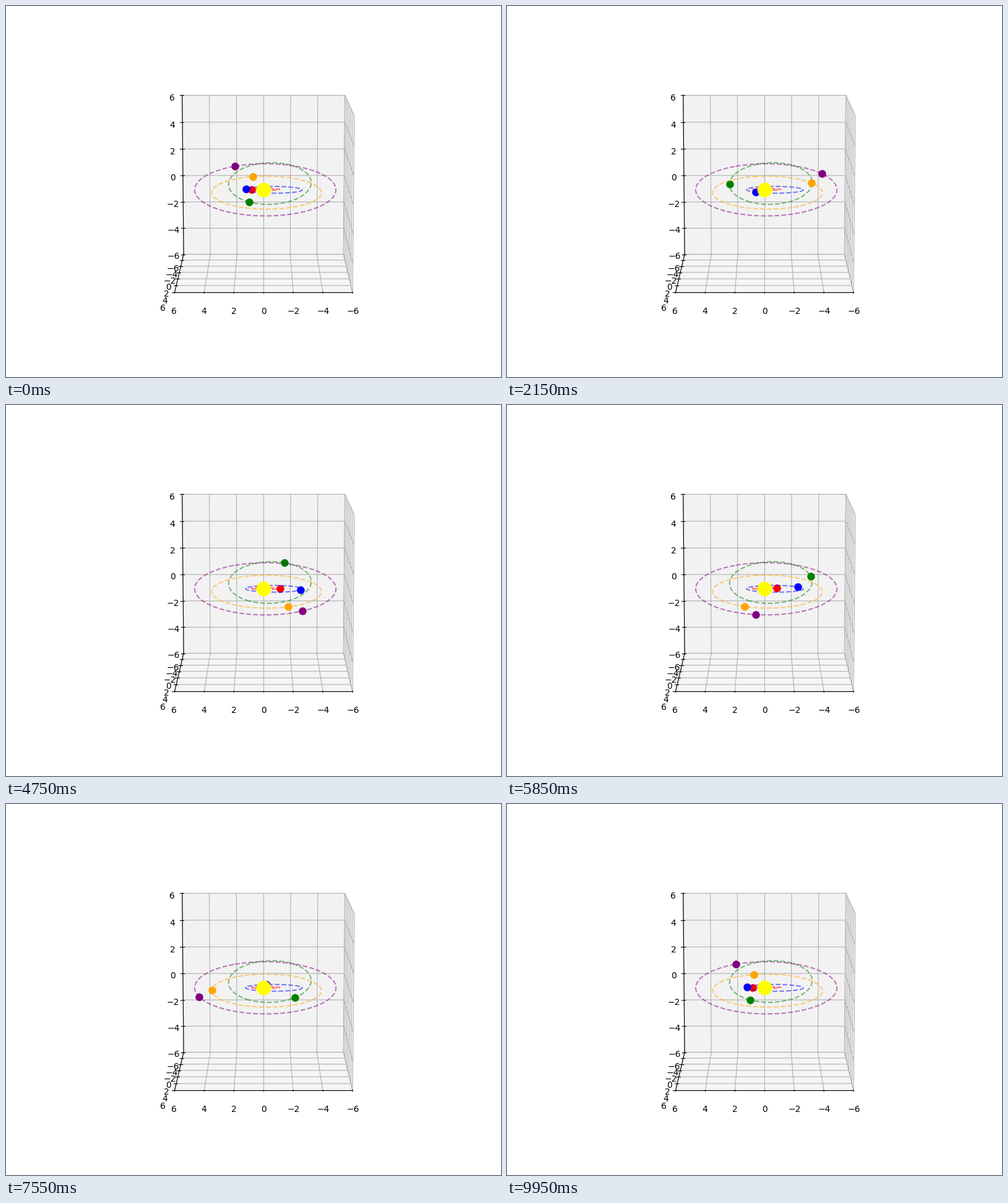
Write a matplotlib script that moves like this. It is 800 px wide and 600 px high and loops after 10000 ms.

```python
import numpy as np
import matplotlib.pyplot as plt
from matplotlib.animation import FuncAnimation

FRAMES = 200
INTERVAL = 50

# colour, semi-major axis, eccentricity, inclination and periapsis in degrees
PLANETS = [
    ("red", 1, 0.15, 6.6, 8.2),
    ("blue", 2, 0.372, 2.65, -10.5),
    ("green", 3, 0.30, 39.3, -60.5),
    ("orange", 4, 0.23, 27.2, 76.4),
    ("purple", 5, 0.06, 31.7, 65.5),
]


def position(theta, a, e, inc, peri):
    """Point on a tilted ellipse with the sun in one focus."""
    r = a * (1 - e**2) / (1 + e * np.cos(theta))
    u = theta + np.radians(peri)
    inc = np.radians(inc)
    across = r * np.sin(u)
    return r * np.cos(u), across * np.cos(inc), across * np.sin(inc)


fig = plt.figure(figsize=(8, 6), dpi=100)
ax = fig.add_subplot(projection="3d")
ax.set(xlim=(-6, 6), ylim=(-6, 6), zlim=(-6, 6))
ax.set_box_aspect((1, 1, 1))
ax.view_init(elev=10, azim=90)

angles = np.linspace(0, 2 * np.pi, FRAMES)
dots = []
for color, *orbit in PLANETS:
    ax.plot(*position(angles, *orbit), "--", color=color, alpha=0.5)
    dots += ax.plot([], [], [], "o", color=color, markersize=8)
ax.plot([0], [0], [0], "o", color="yellow", markersize=16, zorder=3)


def update(frame):
    for dot, (_, *orbit) in zip(dots, PLANETS):
        x, y, z = position(angles[frame], *orbit)
        dot.set_data_3d([x], [y], [z])
    return dots


anim = FuncAnimation(fig, update, frames=FRAMES, interval=INTERVAL,
                     repeat=True, repeat_delay=0)
plt.show()
```
